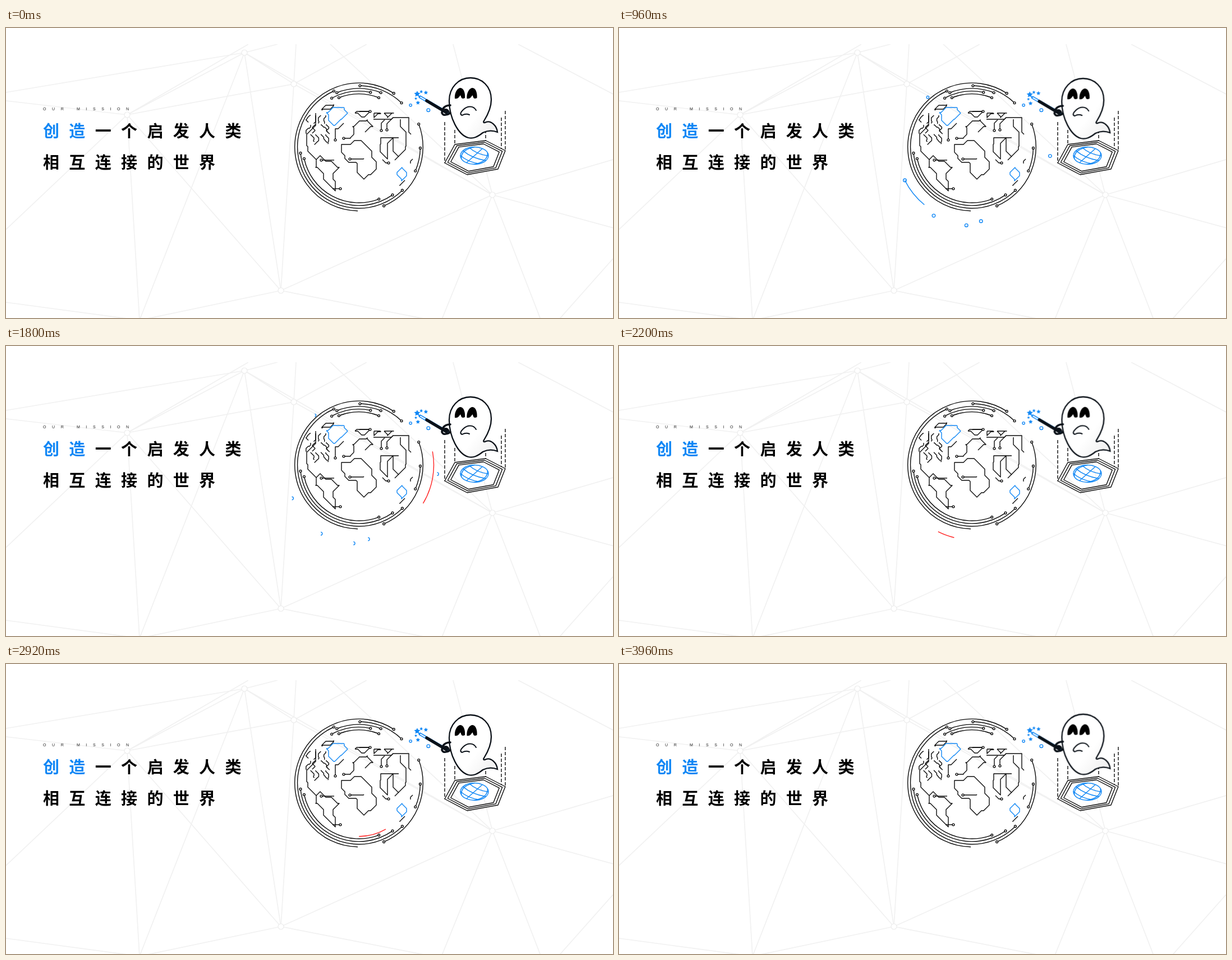
These frames come from a looping animation (1082 by 518 pixels, 4 s). An HTML page:

```html
<!DOCTYPE html>
<html lang="zh-CN">
<head>
<meta charset="utf-8">
<title>Our mission</title>
<style>
html, body { margin: 0; width: 100%; height: 100%; overflow: hidden; background: #fff; }
svg { display: block; width: 1082px; height: 518px; }
.line, .blue, .red { fill: none; stroke: #0a0a0a; stroke-width: 1.4; stroke-linejoin: round; }
.blue { stroke: #1087f5; }
.red { stroke: #f22; }
.pin { fill: #fff; stroke: #0a0a0a; stroke-width: 1.4; }
.net { fill: none; stroke: #f1f1f1; stroke-width: 1.7; }
.node { fill: #fff; stroke: #ececec; stroke-width: 1.2; }
.dash { stroke-dasharray: 6 3; }
.mesh * { vector-effect: non-scaling-stroke; }
.small { font: 7px "Liberation Sans", Arial, sans-serif; letter-spacing: 10.6px; fill: #222; }
.big { font: 700 29px "Noto Sans CJK SC", "Noto Sans CJK", sans-serif; letter-spacing: 17.35px; fill: #000; }
.big tspan { fill: #1087f5; }
#ghost { animation: float 4s linear infinite; }
@keyframes float {
  0%, 100% { transform: translate(0, 0); }
  15%, 62% { transform: translate(-1px, 1.6px); }
  32%, 99% { transform: translate(-.6px, .7px); }
  45%, 73% { transform: translate(0, 2px); }
}
</style>
</head>
<body>
<svg viewBox="0 0 1082 518">
  <defs>
    <clipPath id="below"><path d="M0 29H1082V518H0z"/></clipPath>
    <linearGradient id="skin" x1="0" y1="0" x2="1" y2="1">
      <stop offset=".6" stop-color="#fff"/><stop offset="1" stop-color="#ececec"/>
    </linearGradient>
    <path id="eye" d="M800 126C799 115 805 107 810 107 816 107 819 117 818 125Q814 127 812 125L810 120 807 124Q804 127 800 126z"/>
    <path id="hex" d="M782 241 800 208 855 201 890 219 877 252 822 262z" vector-effect="non-scaling-stroke"/>
  </defs>

  <g id="net" clip-path="url(#below)"></g>

  <text class="small" x="66" y="147">OUR MISSION</text>
  <text class="big" x="66" y="195"><tspan>创造</tspan>一个启发人类</text>
  <text class="big" x="66" y="250.5">相互连接的世界</text>

  <g id="globe"></g>
  <g id="pins"></g>

  <path class="line dash" d="M782 168V241M800 182V208M855 182V201M883 160V216M890 148V219"/>
  <g id="platform" class="line"></g>
  <g id="mesh" class="blue mesh" transform="translate(835 228) scale(25 15.5) rotate(35)"></g>

  <g id="trails"></g>
  <g id="dots"></g>

  <g id="ghost">
    <g id="stars" fill="#1087f5"></g>
    <g fill="none" stroke="#0b1118" stroke-linecap="round">
      <path d="M738 123 786 151" stroke="#1087f5" stroke-width="5"/>
      <path d="M739 123.600 747 128.300" stroke="#fff" stroke-width="2"/>
      <path d="M750 130 785 151" stroke-width="5.500"/>
      <path d="M828 89C848 89 865 104 865 128 865 143 857 158 852 166 850 169 852 170 856 168 864 165 875 174 876 186 866 182 858 183 850 187 840 195 833 198 824 196 806 191 790 160 790 130 790 106 807 89 828 89z" fill="url(#skin)" stroke-width="2.300"/>
      <path d="M792 138Q783 138 779 144M792 152Q786 156 780 155 774 151 780 147 786 144 789 150" stroke-width="3.600"/>
      <path d="M838 147C833 138 822 139 815 146 811 150 808 154 813 156 818 153 822 153 826 155" stroke-width="2"/>
    </g>
    <use href="#eye"/><use href="#eye" x="21.500"/>
  </g>
</svg>
<script>
const CX = 629, CY = 212.5, LOOP = 4000;

function add(parent, tag, attrs) {
  const el = document.createElementNS('http://www.w3.org/2000/svg', tag);
  for (const k in attrs) el.setAttribute(k, attrs[k]);
  return document.getElementById(parent).appendChild(el);
}

function polar(r, deg, cx = CX, cy = CY) {
  const a = deg * Math.PI / 180;
  return [cx + r * Math.cos(a), cy + r * Math.sin(a)];
}

function arc(r, a, b) {
  const lo = Math.min(a, b), hi = Math.max(a, b);
  if (hi - lo < .1) return '';
  return `M${polar(r, lo)}A${r} ${r} 0 ${hi - lo > 180 ? 1 : 0} 1 ${polar(r, hi)}`;
}

const pin = ([cx, cy]) => add('pins', 'circle', { class: 'pin', cx, cy, r: 1.9 });
const parse = s => s.split(' ').map(p => p.split(',').map(Number));

// Background web: each hub with the ends of its spokes
function hub(x, y, ends) {
  add('net', 'path', { class: 'net', d: parse(ends).map(p => `M${x} ${y}L${p}`).join('') });
  return () => add('net', 'circle', { class: 'node', cx: x, cy: y, r: 5 });
}
[
  hub(425, 44, '0,115 484,29 238,522 490,469 867,298'),
  hub(216, 155, '0,130 432,29 425,44 513,100 0,360 238,522 490,469'),
  hub(513, 100, '425,44 517,29 643,29 490,469 867,298'),
  hub(867, 298, '578,29 797,29 490,469 775,525 952,518 1082,235 1082,357'),
  hub(490, 469, '238,522 775,525')
].forEach(node => node());
hub(238, 522, '0,490');
hub(1082, 118, '913,29');
hub(1082, 412, '988,518');

// Circuit line: a straight run, then a diagonal, between key points
function circuit(points, cls = 'line') {
  const pts = typeof points === 'string' ? parse(points) : points;
  const d = pts.slice(1).map(([x, y], i) => {
    const [px, py] = pts[i], dx = x - px, dy = y - py;
    const m = Math.min(Math.abs(dx), Math.abs(dy));
    return `L${x - Math.sign(dx) * m} ${y - Math.sign(dy) * m}L${x} ${y}`;
  });
  add('globe', 'path', { class: cls, d: 'M' + pts[0] + d.join('') });
  return pts[0];
}

// Americas
circuit('552,152 536,190 538,212 553,235');
circuit('563,147 570,138 584,137 578,145 563,147');
circuit('553,235 552,249 566,260 572,276 587,291 583,270 594,249 580,238 560,228 553,235');
// Africa and Europe
circuit('598,222 598,208 621,201 652,220 660,239 650,262 638,270 626,258 624,240 604,233 598,222');
circuit('620,190 618,176 630,166 644,164 654,176 640,186');
circuit('622,152 634,159 649,149 622,152');
circuit('656,152 668,153 656,160 656,152');
circuit('674,152 691,152 680,160 674,152');
// Asia
circuit('655,163 690,160 718,160 722,190');
circuit('703,163 713,186 712,212 693,236');
circuit('700,196 668,196 667,208 680,234 690,196 700,230');
circuit('702,282 711,272');
circuit('721,242 725,234');
// Greenland and Australia
circuit('571,151 583,142 603,143 609,152 598,163 586,174 575,165 571,151', 'blue');
circuit('697,262 706,249 714,258 705,273 697,262', 'blue');

// Wires that begin at a pin
['587,200 587,180 602,170', '602,197 614,197 620,190', '669,183 675,164', '679,182 690,160',
 '562,236 585,236', '613,234 638,233', '596,287 582,287', '682,241 671,235', '649,149 630,150']
  .forEach(w => pin(circuit(w)));

// Small northern islands
let seed = 11;
const rand = () => (seed = seed * 16807 % 2147483647) / 2147483647;
for (let i = 0; i < 12; i++) {
  let x = 543 + 9 * (i % 4), y = 156 + 17 * Math.floor(i / 4);
  const pts = [[x, y]];
  for (let k = 0; k < 3; k++) pts.push([x += rand() * 12 - 6, y += 3 + rand() * 4]);
  circuit(pts);
}

// Rings sit on evenly spaced lanes, counted inwards
function ring(lane, a, b, open) {
  const r = 114.3 - 4.85 * lane;
  add('globe', 'path', { class: 'line', d: arc(r, a, b) });
  if (!open) pin(polar(r, a));
  pin(polar(r, b));
}
ring(0, 91, 303, true);
ring(0, -21, 67);
ring(1, 45, 246);
ring(1, 271, 314);
ring(1, 1, 23);
ring(2, 55, 174);
ring(2, 248, 292);
ring(3, 69, 168);
ring(3, 241, 282);
ring(4, 248, 292);

for (const s of [1, .9, .8])
  add('platform', 'use', { href: '#hex', transform: `translate(836 231) scale(${s}) translate(-836 -231)` });

add('mesh', 'circle', { r: 1 });
for (const k of [-.55, 0, .55]) {
  const w = Math.sqrt(1 - k * k);
  add('mesh', 'path', { d: `M${-w} ${k}Q0 ${k + .35} ${w} ${k}M${k} ${-w}Q${k * 2.2} 0 ${k} ${w}` });
}

// Five stars fan out around the tip of the wand
[.75, .5, 1.1, .6, .75].forEach((size, i) => {
  const [x, y] = polar(11.5, 132 + 43 * i, 742, 125);
  const pts = Array.from({ length: 10 }, (_, k) => polar((k % 2 ? 2.6 : 5.2) * size, 36 * k - 90, x, y));
  add('stars', 'polygon', { points: pts.join(' ') });
});

const clamp = v => Math.max(0, Math.min(1, v));
const out = v => 1 - (1 - v) * (1 - v);
const linear = v => v;
const mix = (t, t0, t1, a, b, ease = linear) => a + (b - a) * ease(clamp((t - t0) / (t1 - t0)));

// Each sweep runs from one dot to another: the head leads, the tail follows
const sweeps = [
  { r: 140.3, from: -28, to: -241, head: [10, 480], tail: [74, 907] },
  { r: 133.5, from: 83, to: 153.5, head: [620, 880], tail: [820, 1160] },
  { r: 118.6, from: -39, to: 228.5, head: [1140, 1560], tail: [1300, 1700] },
  { r: 140.3, from: 6.6, to: 94, head: [1250, 1500], tail: [1420, 1700] }
];
const dots = [];
for (const s of sweeps) {
  s.el = add('trails', 'path', { class: 'blue' });
  const r = s.r < 120 ? 2.2 : 2.8;
  for (const deg of [s.from, s.to]) {
    const [x, y] = polar(s.r, deg);
    const el = add('dots', 'path', { class: 'blue', pathLength: 1,
      d: `M${x} ${y - r}a${r} ${r} 0 0 1 0 ${2 * r}a${r} ${r} 0 0 1 0 ${-2 * r}` });
    // the two dots beside the wand always stay
    if (deg >= -20 || deg < -90) dots.push(el);
  }
}

// Red dashes pass angle `mid` at time `at`
const comets = [
  { start: 1720, end: 2220, at: 1800, mid: 10, speed: .25, half: 20.7, r: 133.5, grow: 0 },
  { start: 2270, end: 2860, at: 2480, mid: 184, speed: .08, half: 17.6, r: 132.8, grow: 28 },
  { start: 2850, end: 3920, at: 2920, mid: 75, speed: -.11, half: 15, r: 95.5, grow: 0 }
].map(c => ({ ...c, el: add('trails', 'path', { class: 'red' }) }));

function draw(now) {
  const t = now % LOOP;
  for (const { el, r, from, to, head, tail } of sweeps) {
    const live = t > head[0] && t < tail[1];
    el.setAttribute('d', live ? arc(r, mix(t, ...head, from, to, out), mix(t, ...tail, from, to, out)) : '');
  }
  const shown = t < 1000 ? mix(t, 80, 420, 0, 1) : mix(t, 1690, 1910, 1, 0);
  for (const el of dots) {
    el.style.strokeDasharray = `${shown} 2`;
    el.style.visibility = shown > 0 ? 'visible' : 'hidden';
  }
  for (const c of comets) {
    const half = c.half * clamp(Math.min(t - c.start, c.end - t) / 60);
    const mid = c.mid + (t - c.at) * c.speed;
    c.el.setAttribute('d', arc(c.r + mix(t, c.at, c.end, 0, c.grow), mid - half, mid + half));
  }
}

const start = performance.now();
function tick() {
  draw(performance.now() - start);
  requestAnimationFrame(tick);
}
tick();
</script>
</body>
</html>
```
